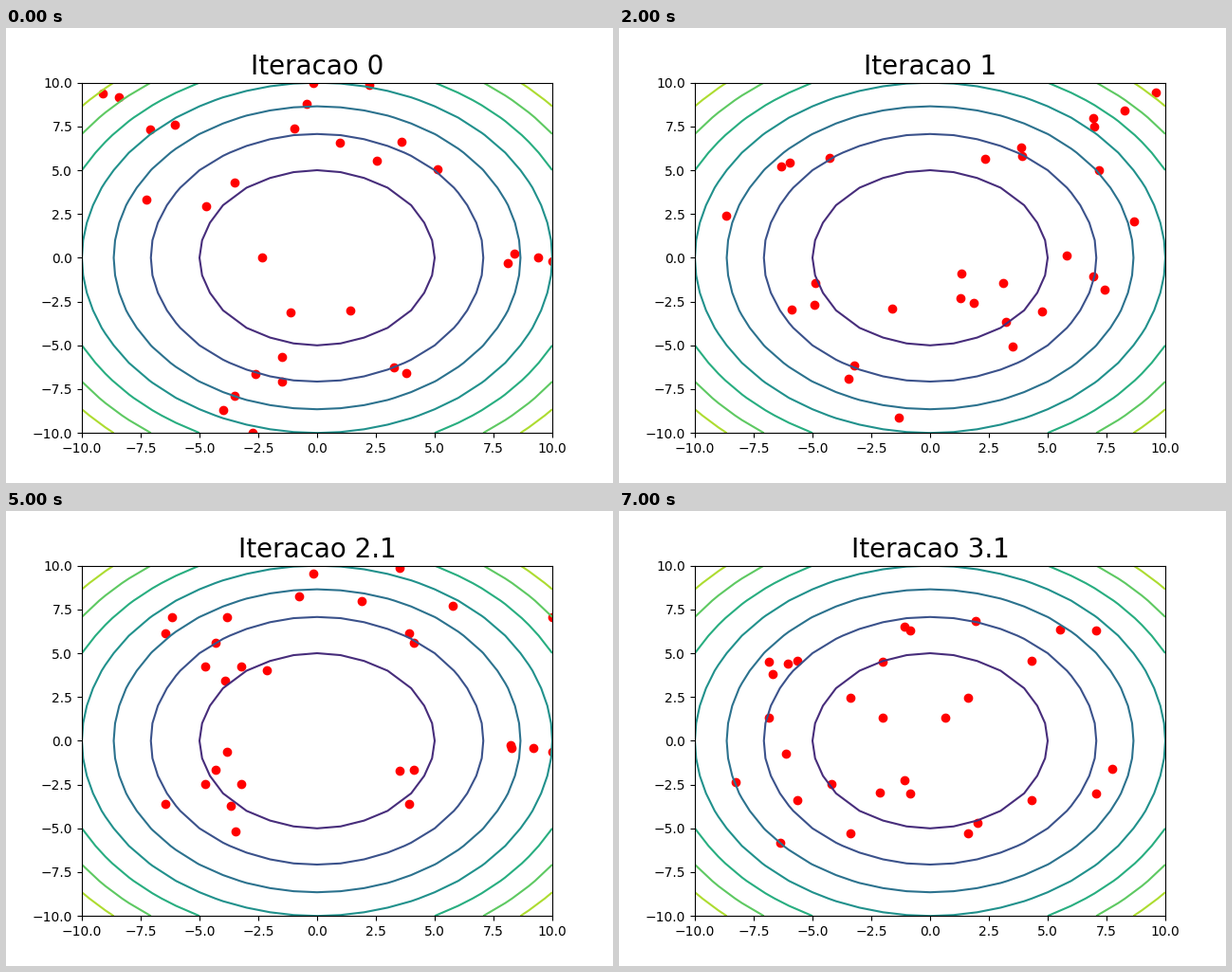
A matplotlib script that plays this animation: 640 by 480 pixels, repeating every 8 s.

```python
import numpy as np
import matplotlib.pyplot as plt
from matplotlib.animation import FuncAnimation

LIMIT = 10
SIZE = 30
CHILDREN = 8
SPREAD = 1.6

rng = np.random.default_rng(4)

# A few centres around which each generation gathers.
CENTRES = [
    [(-6.05, 7.6), (-0.45, 8.8), (3.6, 6.6), (9.4, 0),
     (-4.7, 2.95), (-1.5, -5.65), (-4, -8.7), (3.8, -6.6)],
    [(8.25, 8.4), (-5.95, 5.45), (3.9, 5.8), (7.4, -1.8),
     (4.75, -3.05), (-4.9, -2.7), (-1.35, -9.1), (1.85, -2.6)],
    [(-7.15, 8.85), (-0.75, 8.25), (-3.9, 3.45), (5.75, 7.7),
     (9.65, 4.45), (8.25, -0.4), (3.9, -3.6), (-3.65, -3.7)],
    [(7, 7.45), (-1.1, 6.5), (-6.85, 4.5), (-2, 1.3),
     (7.75, -1.6), (-8.25, -2.35), (-2.15, -2.95), (2, -4.7)],
]


def populate(centres):
    """One point on each centre, the rest scattered around them."""
    points = np.resize(centres, (SIZE, 2)).astype(float)
    rest = points[len(centres):]
    rest += rng.normal(0, SPREAD, rest.shape)
    return np.clip(points, -LIMIT, LIMIT)


def evolve(points):
    """Replace the weakest points by pairs of parents with swapped y."""
    order = np.argsort(np.hypot(*points.T))
    best = points[order[:SIZE - CHILDREN]]
    parents = rng.permutation(best)[:CHILDREN]
    children = np.column_stack([parents[:, 0], parents[::-1, 1]])
    return np.vstack([best, children])


states = []
for generation, centres in enumerate(CENTRES):
    points = populate(centres)
    states += [points, evolve(points) if generation else points]

fig, ax = plt.subplots(figsize=(6.4, 4.8), dpi=100)
axis = np.arange(-LIMIT, LIMIT + 1)
x, y = np.meshgrid(axis, axis)
ax.contour(x, y, x**2 + y**2)
dots = ax.scatter([], [], color="red")
ax.set(xlim=(-LIMIT, LIMIT), ylim=(-LIMIT, LIMIT))
title = ax.set_title("", fontsize=20)


def draw(i):
    generation, evolved = divmod(i, 2)
    title.set_text(f"Iteracao {generation}" + (".1" if evolved else ""))
    dots.set_offsets(states[i])
    return dots, title


anim = FuncAnimation(fig, draw, frames=len(states), interval=1000, repeat=True)
plt.show()
```
